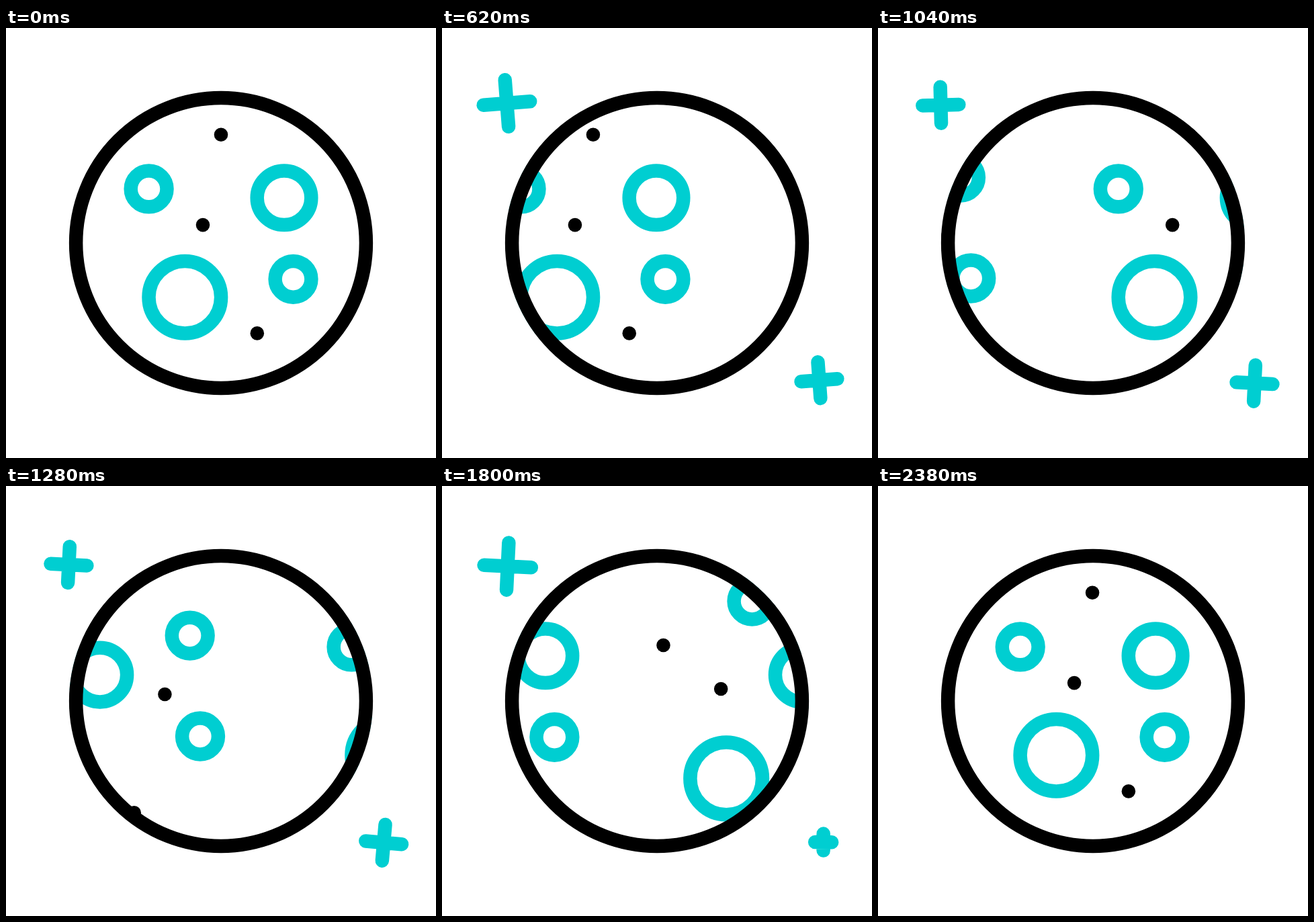
An HTML page with a canvas for the animation above (2.4 s loop, 640 by 640 pixels).

```html
<!DOCTYPE html>
<html>
<head>
<meta charset="utf-8">
<title>Turning moon</title>
<style>
html, body { margin: 0; height: 100%; overflow: hidden; background: #fff; }
canvas { display: block; width: 100vw; height: 100vh; }
</style>
</head>
<body>
<canvas id="stage" width="640" height="640"></canvas>
<script>
const ctx = document.getElementById('stage').getContext('2d');
const LOOP = 2400, TEAL = '#00ced1', BLACK = '#000';
const SMALL = 26.9, MEDIUM = 40.3, LARGE = 53.8;

const front = {
  rings: [[212.6, 239.4, SMALL], [414, 252.8, MEDIUM], [266.3, 400.7, LARGE], [427.5, 373.8, SMALL]],
  dots: [[320, 158.7], [293, 293.1], [373.8, 454.4]]
};
const back = {
  rings: [[249.3, 171.5, SMALL], [458, 222.6, SMALL], [324.1, 281.1, MEDIUM], [473.3, 372.5, SMALL], [211, 435.4, LARGE]],
  dots: [[203, 302], [420.7, 310], [375, 486.3], [117.3, 237]]
};

// Keyframes as [time, value], eased in and out
const frontExit = [[0, 0], [480, -118], [1590, 400]];
const frontReturn = [[1500, -350], [2408, 0]];
const backPass = [[730, -420.3], [2290, 404.5]];
const starSize = [[0, 0], [320, 36], [600, 27], [1300, 27], [1620, 36], [1920, 0]];
const starTilt = [[0, 0], [480, -5], [1280, 5], [1880, 0]];

function ease(keys, t) {
  if (t <= keys[0][0]) return keys[0][1];
  for (let i = 1; i < keys.length; i++) {
    const [t0, v0] = keys[i - 1], [t1, v1] = keys[i];
    if (t < t1) {
      const u = (t - t0) / (t1 - t0);
      return v0 + (v1 - v0) * u * u * (3 - 2 * u);
    }
  }
  return keys[keys.length - 1][1];
}

function circle(x, y, r) {
  ctx.beginPath();
  ctx.arc(x, y, r, 0, 2 * Math.PI);
}

function drawSurface({ rings, dots }, shift) {
  ctx.strokeStyle = TEAL;
  ctx.fillStyle = BLACK;
  for (const [x, y, r] of rings) { circle(x + shift, y, r); ctx.stroke(); }
  for (const [x, y] of dots) { circle(x + shift, y, 10.3); ctx.fill(); }
}

function drawStar(x, y, orbit, t) {
  const size = ease(starSize, t);
  if (size < 0.3) return;
  const angle = (320 - 0.154 * t) * Math.PI / 180;
  ctx.save();
  ctx.translate(x + orbit * Math.cos(angle), y + orbit * Math.sin(angle));
  ctx.rotate(ease(starTilt, t) * Math.PI / 180);
  ctx.strokeStyle = TEAL;
  ctx.beginPath();
  ctx.moveTo(-size, 0);
  ctx.lineTo(size, 0);
  ctx.moveTo(0, -size);
  ctx.lineTo(0, size);
  ctx.stroke();
  ctx.restore();
}

function draw(now) {
  const t = now % LOOP;
  ctx.fillStyle = '#fff';
  ctx.fillRect(0, 0, 640, 640);
  ctx.lineWidth = 20.5;
  ctx.lineCap = 'round';

  ctx.save();
  circle(320, 320, 226);
  ctx.clip();
  drawSurface(back, ease(backPass, t));
  drawSurface(front, ease(t < 1500 ? frontExit : frontReturn, t));
  ctx.restore();

  ctx.strokeStyle = BLACK;
  circle(320, 320, 215.9);
  ctx.stroke();

  drawStar(97, 115.8, 3.8, t - 240);
  drawStar(564.5, 527.2, 4.3, t);
}

const start = performance.now();
(function tick() {
  draw(performance.now() - start);
  requestAnimationFrame(tick);
})();
</script>
</body>
</html>
```
